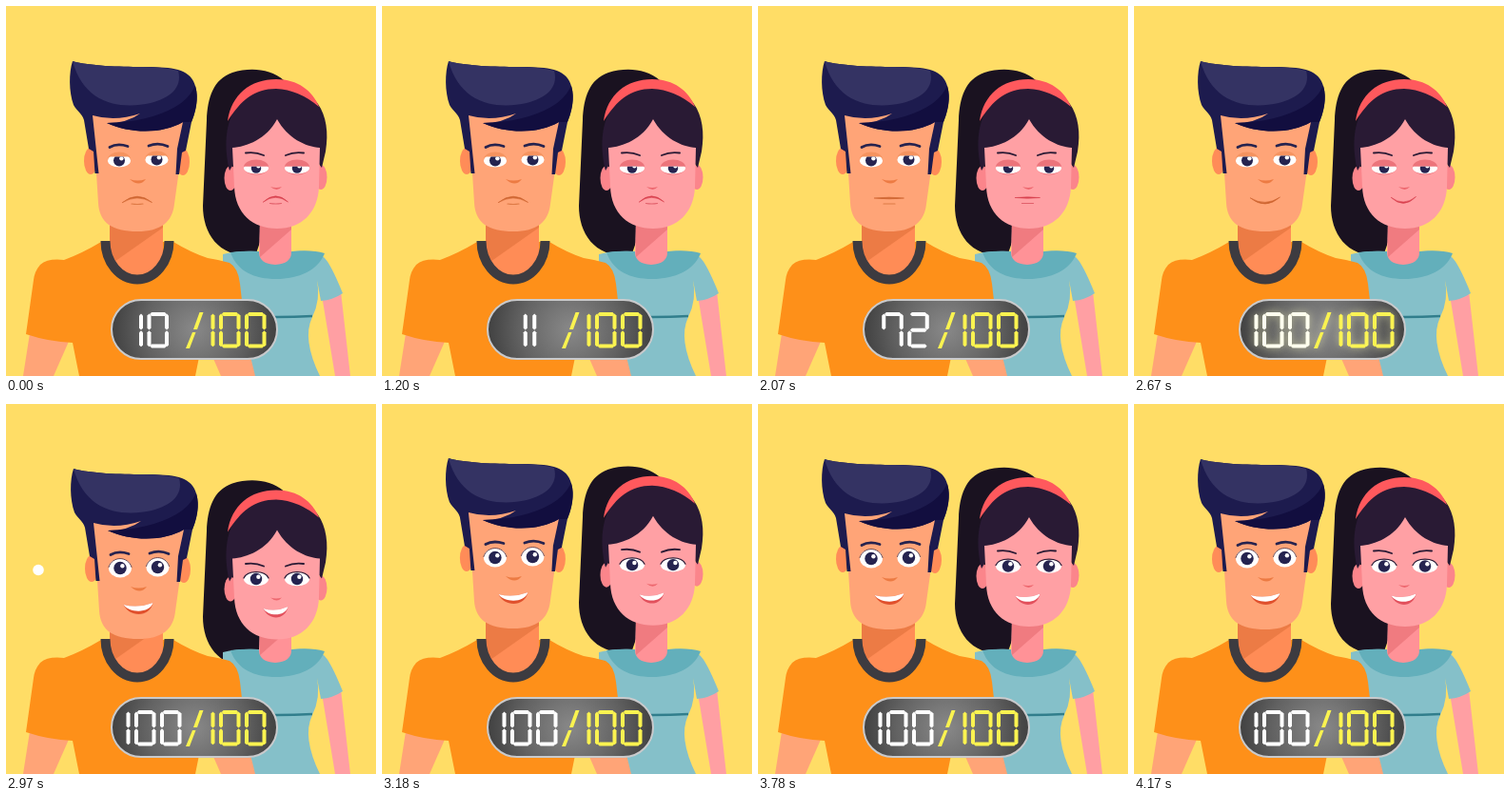
Write an HTML page with a canvas that moves like this. It is 389 px wide and 389 px high and loops after 4200 ms.

```html
<!DOCTYPE html>
<html lang="en">
<head>
<meta charset="utf-8">
<title>Mood counter</title>
<style>
html, body { margin: 0; width: 100%; height: 100%; overflow: hidden; background: #ffdd66; }
canvas { display: block; width: 389px; height: 389px; }
</style>
</head>
<body>
<canvas id="stage"></canvas>
<script>
const SIZE = 389, LOOP = 4200, STEP = 30;
const canvas = document.getElementById('stage');
const ctx = canvas.getContext('2d');
const dpr = Math.max(1, window.devicePixelRatio || 1);
canvas.width = canvas.height = Math.round(SIZE * dpr);

const clamp = x => Math.min(1, Math.max(0, x));
const mix = (a, b, k) => a + (b - a) * k;
const ramp = (t, a, b) => clamp((t - a) / (b - a));
const smooth = (t, a, b) => { const k = ramp(t, a, b); return k * k * (3 - 2 * k); };

function fill(d, color) {
  ctx.fillStyle = color;
  ctx.fill(new Path2D(d));
}
function line(d, color, width, cap = 'round') {
  ctx.strokeStyle = color;
  ctx.lineWidth = width;
  ctx.lineCap = cap;
  ctx.stroke(new Path2D(d));
}
function oval(x, y, rx, ry, color) {
  ctx.fillStyle = color;
  ctx.beginPath();
  ctx.ellipse(x, y, rx, ry, 0, 0, Math.PI * 2);
  ctx.fill();
}
function shifted(x, y, draw) {
  ctx.save();
  ctx.translate(x, y);
  draw();
  ctx.restore();
}

// ---- shared face parts ----
function eye(x, y, e, open) {
  const ry = mix(e.ry0, e.ry, open);
  const lid = mix(y - e.cut, y - ry, open);
  if (open < 1) oval(x, y - 1, e.rx, mix(e.lidRy, ry, open), e.lid);
  ctx.save();
  ctx.beginPath();
  ctx.rect(x - 20, lid, 40, 40);
  ctx.clip();
  oval(x, y, e.rx, ry, '#fff');
  const r = mix(e.r0, e.r, open);
  oval(x, y, r, r, '#25234f');
  oval(x + 2.4, y - 2.2, 2.2, 2.2, '#fff');
  ctx.restore();
  if (open > 0) {
    ctx.globalAlpha = open;
    line(`M${x - e.rx} ${y - 1}C${x - e.rx * .7} ${y - ry * 1.3} ${x + e.rx * .7} ${y - ry * 1.3} ${x + e.rx} ${y - 1}`, e.lash, e.lashW);
    ctx.globalAlpha = 1;
  }
}

// bend: -1 frown, 0 flat, 1 smile
function mouth(m, bend, open) {
  const { x, y, w } = m;
  const end = bend < 0 ? y - bend * m.sad : y;
  const bow = 2 * (bend < 0 ? y - 1 : y + bend * m.smile) - end;
  if (open < 0.02) {
    const d = `M${x - w} ${end}Q${x} ${bow - m.thick} ${x + w} ${end - Math.max(0, bend)}Q${x} ${bow + m.thick} ${x - w} ${end}Z`;
    fill(d, m.color);
    line(d, m.color, 0.6);
    if (bend < 0.4) line(`M${x - 6} ${y + 6}Q${x} ${y + 6 - bend} ${x + 6} ${y + 6}`, m.crease, 1.2);
    return;
  }
  const left = mix(end, m.openY, open), right = left - 2;
  const top = mix(bow, left + 4, open);
  const crescent = depth => {
    const low = mix(bow + 1, left + depth * 1.35, open);
    return `M${x - w} ${left}Q${x} ${top} ${x + w} ${right}C${x + w * .8} ${low} ${x - w * .6} ${low} ${x - w} ${left}Z`;
  };
  fill(crescent(m.depth), m.lip);
  fill(crescent(m.depth * .68), '#fff');
}

const manEye = { rx: 12, ry: 10, ry0: 7, cut: 4, lidRy: 8, r0: 6, r: 6.7, lid: '#f5935f', lash: '#5a3a48', lashW: 0.9 };
const womanEye = { rx: 13, ry: 7.3, ry0: 6, cut: 1.8, lidRy: 8, r0: 5.2, r: 6.2, lid: '#ec747b', lash: '#2a1a35', lashW: 1.3 };
const manMouth = { x: 138, y: 202, w: 15.5, sad: 4.5, smile: 5.5, openY: 201, depth: 10,
  thick: 1.7, color: '#cd642f', crease: '#de7a46', lip: '#e0502c' };
const womanMouth = { x: 283.5, y: 201.5, w: 13, sad: 4.5, smile: 5.5, openY: 201.5, depth: 9.5,
  thick: 1.3, color: '#d9424f', crease: '#e2606b', lip: '#e2505c' };

// ---- woman ----
function ponytail() {
  fill('M292 78C278 66 257 64 238 70C218 77 212 96 211 120L207 210C207 240 224 265 262 263L275 225L285 100Z', '#1a1220');
}
function womanBody() {
  fill('M330 304L352 300L362 389H346L333 310Z', '#ff9fa3');
  fill('M228 261Q245 257 266 258H301Q324 256 334 264Q341 270 354 302Q344 309 331 310L327 288Q331 309 322 327Q311 350 330 389H238Q257 350 246 327L228 280Z', '#85c0c9');
  fill('M236 259Q250 257 266 258H301Q322 256 335 260C328 278 308 287 284 287C261 287 243 279 236 259Z', '#63afbb');
  line('M246 326Q285 328 322 326', '#317e8c', 2.4, 'butt');
  fill('M267 222H300V259Q300 271 283 272Q266 271 266 259Z', '#ff9297');
  fill('M267 222H300V235L267 264Z', '#f07b80');
}
function womanHead(bend, open) {
  oval(236, 181, 6.5, 13, '#fb858b');
  oval(331, 180, 6.5, 13, '#fb858b');
  fill('M235 173C225 130 236 89 284 82C325 83 343 113 336 153L332 170L317 151L249 150Z', '#291a34');
  fill('M238 149C253 148 274 140 285 119C296 139 315 148 330 149L329 190C328 217 311 234 285 234C259 234 241 218 240 190Z', '#ffa0a4');
  fill('M233 121C237 93 257 77 284 77C307 77 322 89 329 106Q308 88 284 87C261 87 247 99 233 121Z', '#ff595d');
  line('M252 154.5Q262 153 271 157', '#291a34', 1.9);
  line('M294 157Q303 153 313 154.5', '#291a34', 1.9);
  eye(263, 170.5, womanEye, open);
  eye(306, 170.5, womanEye, open);
  fill('M278 190Q284 192 290 190Q285 196 278 190Z', '#ed686f');
  mouth(womanMouth, bend, open);
}

// ---- man ----
function manBody() {
  fill('M25 344L68 348L50 389H18Z', '#ffa477');
  fill('M208 348L251 344L262 389H226Z', '#ffa477');
  fill('M100 248Q80 260 61 267Q44 265 36 272Q30 279 29 288L21 345Q45 353 70 354L77 389H199L206 354Q230 353 252 345L246 292Q244 275 235 270Q225 267 212 265Q194 259 176 248Z', '#fe9019');
  fill('M109 225H165V262Q160 283 138 283Q113 282 109 262Z', '#ff8c56');
  fill('M109 225H165V233L111 271L109 262Z', '#ec7b45');
  line('M104.5 247A33.5 40.5 0 0 0 171.5 247', '#3d3b40', 10, 'butt');
}
function manHead(bend, open) {
  oval(89, 163, 7, 14, '#ff8c58');
  oval(186, 164, 7, 14, '#ff8c58');
  fill('M90 108H190L183 165L177 208C175 227 163 237 138 237C112 237 98 228 97 207L94 160Z', '#ffa477');
  fill('M70 58C88 63 119 64 143 64C170 64 190 65 197 79C204 93 200 111 195 122L189 152L185 154L182 177H178.5L180 150L186 122C166 134 132 135 106 123Q128 123 141 113Q115 122 91 115L97.5 176H93.5L92 153L87 150L82 120C80 113 75 111 71 104C66 90 66 70 70 58Z', '#1d1b4e');
  fill('M106 123Q150 122 178 106Q192 98 199 84C203 97 199 111 195 122L186 122C166 134 132 135 106 123Z', '#120e3f');
  fill('M70 58C88 63 119 64 143 64Q166 64 181 68C186 86 172 97 152 102C120 109 82 103 70 58Z', '#343363');
  line('M109 148.5Q117 144 128 147.5', '#25234f', 2.8);
  line('M150 147Q160 143 170 147.5', '#25234f', 2.8);
  eye(119, 162.5, manEye, open);
  eye(158.5, 161.5, manEye, open);
  fill('M130 182Q138 185 147 182Q140 191 130 182Z', '#ec7b43');
  mouth(manMouth, bend, open);
}

// ---- counter ----
// segment bits: top, upper right, lower right, bottom, lower left, upper left, middle
const SEGS = [63, 6, 91, 79, 102, 109, 125, 39, 127, 111];
const DW = 22.5, DH = 37.5, TH = 4, ONE = 5, GAP = 4.5;
const widthOf = c => c === '1' ? ONE : DW;

function bar(x, y, len, vertical) {
  const h = TH / 2, c = 1.8, q = len - 1.2;
  const pts = [[0.6, 0], [c + 0.8, -h], [q - c, -h], [q, 0], [q - c, h], [c + 0.8, h]];
  ctx.beginPath();
  pts.forEach(([a, b]) => vertical ? ctx.lineTo(x + b, y + a) : ctx.lineTo(x + a, y + b));
  ctx.closePath();
  ctx.fill();
}
function digit(c, x, y) {
  if (c === '1') x -= DW - ONE;
  const bits = SEGS[+c], h = TH / 2, half = DH / 2;
  const l = x + h, r = x + DW - h, w = r - l + 1;
  const parts = [
    [l, y + h, w, 0], [r, y + 1, half, 1], [r, y + half, half, 1], [l, y + DH - h, w, 0],
    [l, y + half, half, 1], [l, y + 1, half, 1], [l, y + half, w, 0]
  ];
  parts.forEach((p, i) => { if (bits >> i & 1) bar(...p); });
}
function number(text, x, y) {
  for (const c of text) {
    digit(c, x, y);
    x += widthOf(c) + GAP;
  }
}
function counter(value, glow) {
  const g = ctx.createRadialGradient(198, 340, 5, 198, 340, 92);
  g.addColorStop(0, '#858585');
  g.addColorStop(0.55, '#626262');
  g.addColorStop(1, '#3c3c3c');
  ctx.beginPath();
  ctx.roundRect(111, 309, 174, 62, 31);
  ctx.fillStyle = g;
  ctx.fill();
  ctx.strokeStyle = '#c9cacc';
  ctx.lineWidth = 2;
  ctx.stroke();

  const text = String(value);
  const total = [...text].reduce((s, c) => s + widthOf(c) + GAP, -GAP);
  ctx.save();
  ctx.shadowBlur = 9 * glow * dpr;
  ctx.shadowColor = `rgba(255,255,190,${0.6 * glow})`;
  ctx.fillStyle = glow > 0.5 ? '#fffff0' : '#fff';
  number(text, 155 - total / 2, 322);
  ctx.fillStyle = '#faf350';
  number('100', 214.5, 322);
  fill('M189 360L196 343H199.5L193 360Z M197 340L203.5 322H207.5L201 340Z', '#faf350');
  ctx.restore();
}

// ---- white sparks ----
function trail(d, length, from, to, width) {
  if (to <= from) return;
  ctx.save();
  ctx.setLineDash([(to - from) * length, length * 2]);
  ctx.lineDashOffset = -from * length;
  line(d, '#fff', width);
  ctx.restore();
}
function sparks(t) {
  const pop = Math.sin(Math.PI * ramp(t, 2880, 3060));
  if (pop > 0) oval(34, 174.5, 5.8 * pop, 5.8 * pop, '#fff');
  const run = (d, len, w) =>
    trail(d, len, smooth(t, 3420, 3630), smooth(t, 3210, 3420), w);
  run('M46 121Q20 118 0 131', 49, 2.2);
  run('M2 101L-6 92', 12, 2);
  run('M348 156V148', 8, 2.8);
  run('M348.5 141V133', 8, 2.4);
}

// ---- timeline ----
function dip(t) {
  if (t < 2820 || t > 3360) return 0;
  if (t < 2970) return smooth(t, 2820, 2955);
  const s = (t - 2970) / 390;
  return Math.cos(s * Math.PI * 2.5) * (1 - s) ** 2;
}
function render(t) {
  const count = t < 1200 ? 10 : Math.min(100, 11 + 61 * (t - 1200) / 870);
  const bend = count < 72 ? (count - 72) / 62 : (count - 72) / 28;
  const open = smooth(t, 2790, 2940);
  const glow = smooth(t, 2460, 2640) * (1 - smooth(t, 2700, 2910));
  const drop = dip(t);

  ctx.setTransform(dpr, 0, 0, dpr, 0, 0);
  ctx.fillStyle = '#ffdd66';
  ctx.fillRect(0, 0, SIZE, SIZE);
  sparks(t);
  shifted(0, 13.5 * drop, ponytail);
  womanBody();
  shifted(0, 13.5 * drop, () => womanHead(bend, open));
  manBody();
  shifted(drop, 10 * drop, () => manHead(bend, open));
  counter(Math.round(count), glow);
}

const start = performance.now();
function tick() {
  const t = (performance.now() - start) % LOOP;
  render(Math.floor(t / STEP) * STEP);
  requestAnimationFrame(tick);
}
tick();
</script>
</body>
</html>
```
